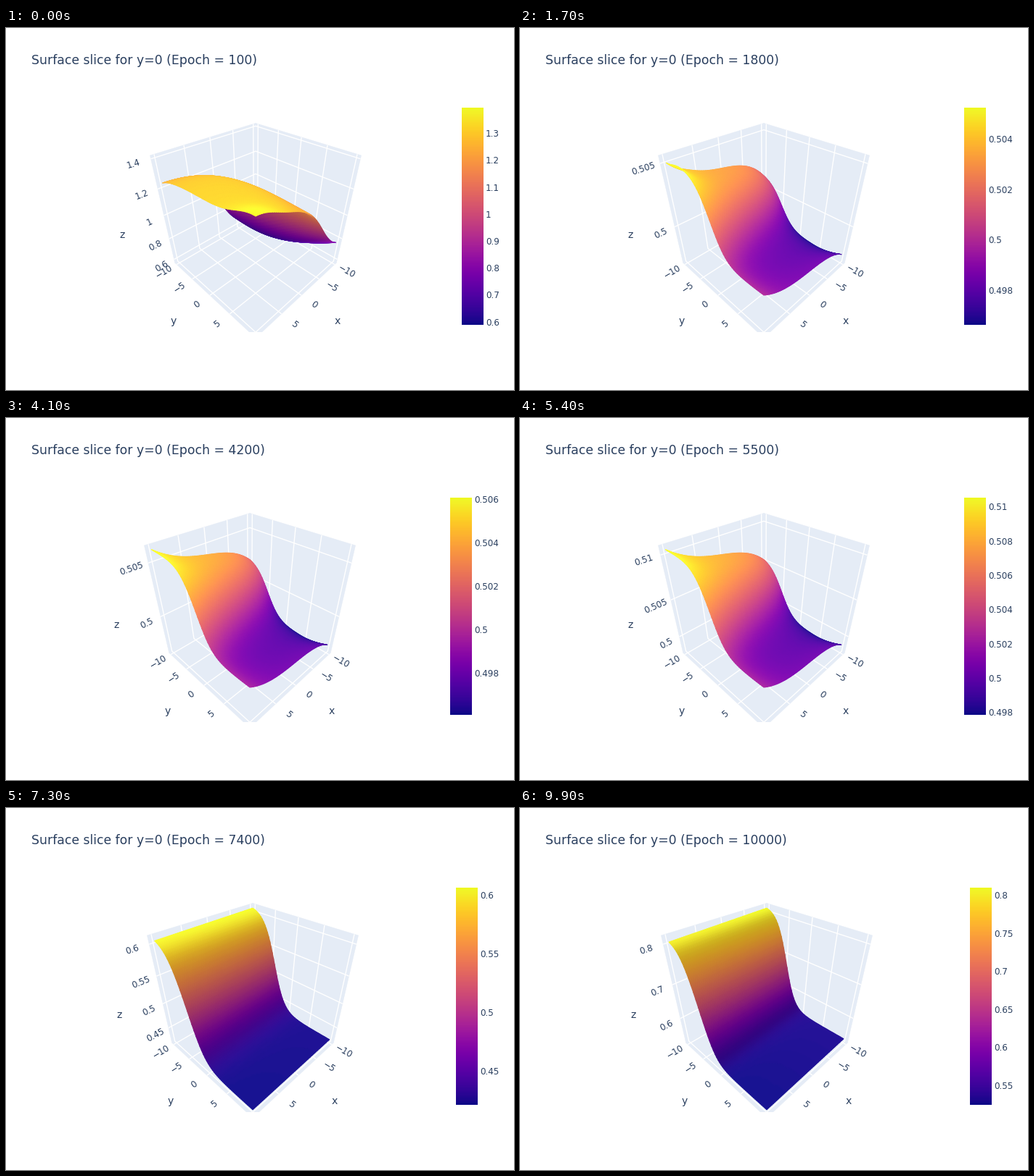
A matplotlib script that plays this animation: 700 px wide and 500 px high, repeating every 10000 ms.

```python
import numpy as np
import matplotlib.pyplot as plt
from matplotlib.animation import FuncAnimation
from matplotlib.collections import LineCollection, PolyCollection
from matplotlib.patches import Rectangle

plt.rcParams["font.family"] = "DejaVu Sans"
W, H, DPI = 700, 500, 100
FRAMES, INTERVAL = 100, 100
INK, WALL = "#2a3f5f", "#e5ecf6"
PX = 72 / DPI
PAD = 34 / 32          # axis range compared with data range
BAR_TOP, BAR_BOTTOM = 110, 410
PLASMA = plt.get_cmap("plasma")

# camera at (1.25, 1.25, 1.25), looking at the middle of a unit cube
RIGHT = np.array([-1, 1, 0]) / np.sqrt(2)
UP = np.array([-1, -1, 2]) / np.sqrt(6)
TOWARD = np.ones(3) / np.sqrt(3)
DIST = 1.25 * np.sqrt(3)
FOCAL = 160 / np.tan(np.pi / 8)

# rows run from back to front, so the mesh paints in depth order
N = 58
AXIS = np.linspace(-10, 10, N)
X, Y = np.meshgrid(AXIS, AXIS, indexing="ij")
GAP = AXIS[1] - AXIS[0]

# epoch, lowest value, highest value
RANGES = np.array([
    (100, .590, 1.396), (1000, .49692, .505), (2800, .49623, .50563),
    (4200, .49607, .50607), (5500, .49787, .51055),
    (7400, .4216, .6068), (10000, .5248, .8105)])


def sigmoid(t):
    return 1 / (1 + np.exp(-t))


def bump(x, y, size):
    return np.exp(-((X - x)**2 + (Y - y)**2) / size)


def ridge():
    high = 1.31 - .07 * np.exp(-(Y + 10) / 4) + .08 * bump(10, 10, 20)
    low = .6 + .1 * ((Y + 5) / 15)**2
    width = 1.5 + .009 * (Y + 2)**2
    return low + (high - low) * sigmoid((X + 2.4 + .2 * Y) / width)


def wave(high, low, dip):
    top, bottom = (c + a * X + b * X**3 for c, a, b in (high, low))
    bottom += .04 * (1 - .075 * X) * (np.maximum(Y - 4, 0) / 6)**2
    fall = sigmoid((.225 * X - 2.6 - Y) / (1.55 - .02 * X))
    return bottom + (top - bottom) * fall - dip * bump(10, -10, 6)


def unit(z):
    return (z - z.min()) / (z.max() - z.min())


SHAPES = [unit(z) for z in (
    ridge(),
    wave((.695, .0055, .00018), (.195, .006, .00011), .05),
    wave((.78, .009, .0001), (.17, .005, .00012), 0),
    sigmoid((-4 - Y) / 1.55) - .0005 * X,
    sigmoid((-4.6 - Y) / 1.35) - .001 * X)]


def shape_at(epoch):
    p = np.interp(epoch, [100, 1000, 2800, 4200, 5500, 6450, 7400, 10000],
                  [0, 1, 1.8, 2, 2, 2.75, 3, 4])
    k = min(int(p), 3)
    return unit(SHAPES[k] * (k + 1 - p) + SHAPES[k + 1] * (p - k))


def range_at(epoch):
    e, lo, hi = RANGES.T
    span = np.exp(np.interp(epoch, e, np.log(hi - lo)))
    mid = .5 + np.exp(np.interp(epoch, e, np.log((lo + hi) / 2 - .5)))
    return mid - span / 2, mid + span / 2


def ticks(lo, hi, count):
    rough = (hi - lo) / count
    base = 10.0**np.floor(np.log10(rough))
    step = base * next(m for m in (2, 5, 10) if rough / base <= m)
    return np.arange(np.ceil(lo / step), np.floor(hi / step) + 1) * step


def label(v):
    return f"{round(v, 6):g}".replace("-", "\u2212")


def project(p, cx):
    p = np.asarray(p, float)
    scale = FOCAL / (DIST - p @ TOWARD)
    return np.stack([cx + scale * (p @ RIGHT), 260 - scale * (p @ UP)], -1)


def surface(n, span, cx):
    pts = np.stack([X / (20 * PAD), Y / (20 * PAD), (n - .5) / PAD], -1)
    sx, sy = np.moveaxis(project(pts, cx), -1, 0)
    zx, zy = np.gradient(n * span, GAP)
    steep = np.hypot(np.maximum(-zy, 0), np.maximum(np.abs(zx) - .03, 0))
    light = np.exp(-(steep / .011)**2)[..., None]
    rgb = PLASMA(n)[..., :3] * (.8 + .2 * light) + .045 * light
    return ax.pcolormesh(sx, sy, np.clip(rgb, 0, 1), shading="gouraud", zorder=3)


fig = plt.figure(figsize=(W / DPI, H / DPI), dpi=DPI, facecolor="white")
ax = fig.add_axes([0, 0, 1, 1])


def draw(i):
    epoch = 100 * (i + 1)
    lo, hi = range_at(epoch)
    span = hi - lo
    ax.cla()
    ax.axis("off")

    bar_ticks = ticks(lo, hi, 8.5)
    cx = 356 - 4 * max(len(label(v)) for v in bar_ticks)
    bar_x = 2 * cx - 60

    ax.imshow(np.linspace(0, 1, 256)[:, None], cmap=PLASMA, aspect="auto",
              origin="lower", extent=(bar_x, bar_x + 30, BAR_BOTTOM, BAR_TOP))
    mesh = surface(shape_at(epoch), span, cx)
    ax.set_xlim(0, W)
    ax.set_ylim(H, 0)
    for v in bar_ticks:
        y = BAR_BOTTOM - (v - lo) / span * (BAR_BOTTOM - BAR_TOP)
        ax.text(bar_x + 33, y + 4.4, label(v), size=12 * PX, color=INK)
    ax.text(35, 50, f"Surface slice for y=0 (Epoch = {epoch})",
            size=17.25 * PX, color=INK)

    window = Rectangle((80, 100), 2 * cx - 160, 320, transform=ax.transData)
    mesh.set_clip_path(window)

    def add(coll, z):
        coll.set_zorder(z)
        ax.add_collection(coll, autolim=False)
        coll.set_clip_path(window)

    def write(p, s, size, turn=0):
        x, y = project(p, cx)
        t = ax.text(x, y, s, size=size * PX, color=INK, rotation=turn,
                    ha="center", va="center", clip_on=True)
        t.set_clip_path(window)

    def tick_label(p, outward, s):
        p, outward = np.array(p), np.array(outward)
        dx, dy = project(p + .12 * outward, cx) - project(p, cx)
        turn = -np.degrees(np.arctan(dy / dx))
        write(p + .12 * outward, s, 12, turn)

    h = .5
    walls = [[(-h, -h, -h), (h, -h, -h), (h, h, -h), (-h, h, -h)],
             [(-h, -h, -h), (h, -h, -h), (h, -h, h), (-h, -h, h)],
             [(-h, -h, -h), (-h, h, -h), (-h, h, h), (-h, -h, h)]]
    add(PolyCollection([project(w, cx) for w in walls],
                       facecolors=WALL, edgecolors=WALL, linewidths=.3), 1)

    grid = []
    for v in range(-10, 11, 5):
        c = v / (20 * PAD)
        grid += [[(c, h, -h), (c, -h, -h), (c, -h, h)],
                 [(h, c, -h), (-h, c, -h), (-h, c, h)]]
        tick_label((c, h, -h), (0, 1, 0), label(v))
        tick_label((h, c, -h), (1, 0, 0), label(v))
    for v in ticks(lo - span / 32, hi + span / 32, 4.285):
        c = (v - (lo + hi) / 2) / (span * PAD)
        grid.append([(h, -h, c), (-h, -h, c), (-h, h, c)])
        tick_label((h, -h, c), (1, 0, 0), label(v))
    add(LineCollection([project(g, cx) for g in grid],
                       colors="white", linewidths=1), 2)

    write((0, .82, -h), "x", 14)
    write((.82, 0, -h), "y", 14)
    write((.83, -h, 0), "z", 14)
    return []


anim = FuncAnimation(fig, draw, frames=FRAMES, init_func=lambda: [],
                     interval=INTERVAL, repeat=True, repeat_delay=0)
plt.show()
```
